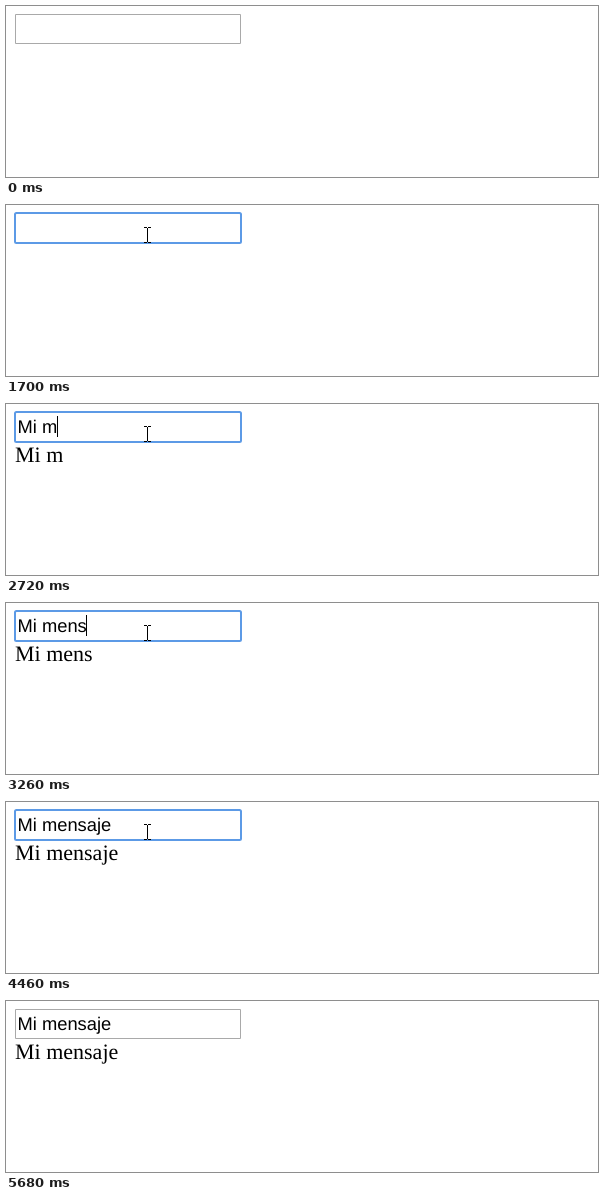
Animation, 592 px wide and 171 px high, one loop 5.76 s. Source, as an HTML page with a canvas:

```html
<!DOCTYPE html>
<html lang="es">
<head>
<meta charset="utf-8">
<title>Mi mensaje</title>
<style>
  html, body { margin: 0; width: 100%; height: 100%; overflow: hidden; background: #fff; }
  canvas { display: block; }
</style>
</head>
<body>
<canvas id="stage" width="592" height="171"></canvas>
<script>
const ctx = document.getElementById('stage').getContext('2d');
const LOOP = 5760;
const MESSAGE = 'Mi mensaje';
const INPUT_FONT = '18.33px "Liberation Sans", Arial, sans-serif';
const OUTPUT_FONT = '22px "Liberation Serif", "Times New Roman", serif';
const TEXT_X = 11.5;
const FOCUS = 1240, BLUR = 5680;

// Moment at which each character of the message is typed.
const KEY_TIMES = [1930, 2340, 2570, 2720, 2940, 3110, 3260, 3490, 3740, 3960];

// Times at which the caret turns on and off.
const CARET_SPANS = [[1240, 1700], [1930, 4460], [4990, 5530]];

// Pointer stops: time, x, y of the hotspot, shape.
const POINTER = [
  [780, 452, 150, drawArrow],
  [850, 336, 94, drawArrow],
  [930, 222, 52, drawArrow],
  [1010, 143, 29, drawBeam],
  [1240, 141, 30, drawBeam],
  [4530, 150, 31, drawBeam],
  [4610, 195, 48, drawArrow],
  [4680, 250, 69, drawArrow],
  [4760, 310, 92, drawArrow],
  [4840, 369, 115, drawArrow],
  [4920, 427, 135, drawArrow],
  [4990, 483, 152, drawArrow],
  [5070, 0, 0, null]
];

const arrowPath = new Path2D('M.5 .5V16.5L4.3 12.8L6.8 18.5L8.9 17.6L6.5 12H11.5Z');

function drawArrow(x, y) {
  ctx.save();
  ctx.translate(x, y);
  ctx.lineWidth = 1;
  ctx.lineJoin = 'round';
  ctx.fillStyle = '#fff';
  ctx.strokeStyle = '#000';
  ctx.fill(arrowPath);
  ctx.stroke(arrowPath);
  ctx.restore();
}

function drawBeam(x, y) {
  ctx.fillStyle = '#000';
  ctx.fillRect(x, y - 7, 1, 14);
  for (const row of [y - 8, y + 7]) {
    ctx.fillRect(x - 3, row, 3, 1);
    ctx.fillRect(x + 1, row, 3, 1);
  }
}

function drawField(focused) {
  ctx.beginPath();
  if (focused) {
    ctx.roundRect(9, 8, 226, 30, 1.5);
    ctx.lineWidth = 2;
    ctx.strokeStyle = '#5c9ae6';
  } else {
    ctx.rect(9.5, 8.5, 225, 29);
    ctx.lineWidth = 1;
    ctx.strokeStyle = '#a9a9a9';
  }
  ctx.stroke();
}

function drawText(text, font, x, baseline) {
  ctx.font = font;
  ctx.textRendering = 'geometricPrecision';
  ctx.fillStyle = '#000';
  ctx.fillText(text, x, baseline);
  return ctx.measureText(text).width;
}

function draw(t) {
  ctx.fillStyle = '#fff';
  ctx.fillRect(0, 0, 592, 171);
  drawField(t >= FOCUS && t < BLUR);

  const text = MESSAGE.slice(0, KEY_TIMES.filter(time => time <= t).length);
  drawText(text, OUTPUT_FONT, 9, 58);
  const width = drawText(text, INPUT_FONT, TEXT_X, 29);

  if (CARET_SPANS.some(([on, off]) => t >= on && t < off)) {
    const caretX = Math.max(12, Math.floor(TEXT_X + width));
    ctx.fillRect(caretX, text ? 12 : 13, 1, 21);
  }

  const stop = POINTER.filter(([time]) => time <= t).pop();
  if (stop) {
    const [, x, y, shape] = stop;
    if (shape) shape(x, y);
  }
}

const start = performance.now();
function tick() {
  draw((performance.now() - start) % LOOP);
  requestAnimationFrame(tick);
}
tick();
</script>
</body>
</html>
```
